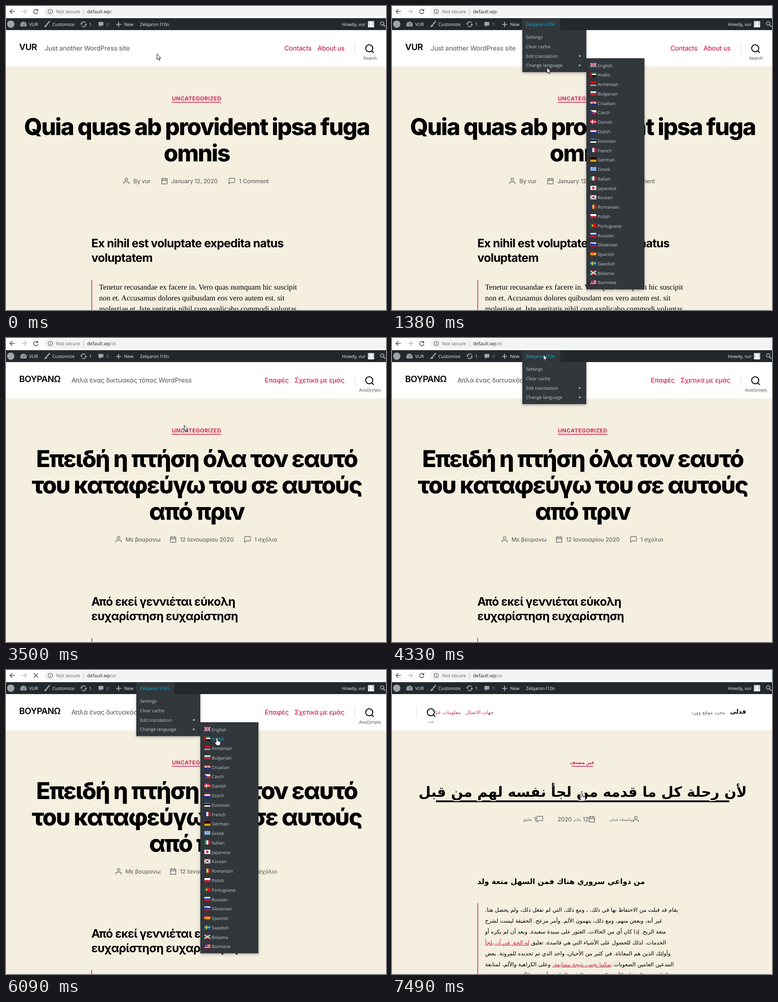
Recreate the animation shown at these times as an HTML page. Size 837 px wide and 669 px high, loop 8 s.

```html
<!DOCTYPE html>
<html lang="en">
<head>
<meta charset="utf-8">
<title>Language switcher</title>
<style>
html, body { margin: 0; width: 100%; height: 100%; overflow: hidden; background: #fff; }
svg { display: block; width: 837px; height: 669px; font-optical-sizing: none; text-rendering: geometricPrecision; }
text { white-space: pre; }
.ui { font-family: "Open Sans", "Noto Sans", sans-serif; }
.site { font-family: Inter, sans-serif; font-weight: 500; letter-spacing: -.015em; }
.h1 { font-weight: 800; font-size: 51.2px; letter-spacing: -.0415625em; text-anchor: middle; }
.h2 { font-weight: 700; font-size: 25.6px; letter-spacing: -.0277778em; }
.brand { font-weight: 600; font-size: 19.2px; letter-spacing: -.0277778em; }
.tag { font-weight: 700; font-size: 12px; letter-spacing: .0366667em; text-anchor: middle; }
.serif { font-family: "Liberation Serif", serif; font-weight: 400; letter-spacing: 0; }
.ar { font-family: "DejaVu Sans", sans-serif; font-weight: 400; letter-spacing: 0; direction: rtl; }
.bold { font-weight: 700; }
.left { text-anchor: end; }
.mid { text-anchor: middle; }
.link { fill: #cd2653; text-decoration: underline; }
.hover text { text-decoration: underline; }
.halo { stroke: #f5efe0; stroke-width: 5px; paint-order: stroke; }
.panel { filter: drop-shadow(0 2px 3px rgba(0,0,0,.28)); }
</style>
</head>
<body>
<svg id="stage" viewBox="0 0 837 669"></svg>
<script>
const ACCENT = '#cd2653', GREY = '#6d6d6d', SAND = '#f5efe0', ICON = '#a0a5aa';
const DARK = '#32373c', PALE = '#c3c8cd', BLUE = '#00b9eb', LOOP = 8000;

const text = (x, y, s, size, fill, cls = '', attrs = '') =>
  `<text x="${x}" y="${y}" class="${cls}" fill="${fill}" ${size ? `font-size="${size}"` : ''} ${attrs}>${s}</text>`;
const rect = (x, y, w, h, fill, attrs = '') =>
  `<rect x="${x}" y="${y}" width="${w}" height="${h}" fill="${fill}" ${attrs}/>`;
const shape = (d, fill) => `<path d="${d}" fill="${fill}"/>`;
const line = (d, stroke, w = 1) => `<path d="${d}" fill="none" stroke="${stroke}" stroke-width="${w}"/>`;
const disc = (x, y, r, fill) => `<circle cx="${x}" cy="${y}" r="${r}" fill="${fill}"/>`;
const ring = (x, y, r, stroke, w) => `<circle cx="${x}" cy="${y}" r="${r}" fill="none" stroke="${stroke}" stroke-width="${w}"/>`;
const group = (id, body, attrs = '') => `<g id="${id}" ${attrs}>${body}</g>`;
const at = (x, y, body) => `<g transform="translate(${x} ${y})">${body}</g>`;

// Post meta icons, centred on the origin
const person = line('M-6 7V5Q-6 2-3 2H3Q6 2 6 5V7', GREY, 1.4) + ring(0, -3.5, 2.9, GREY, 1.4);
const calendar = line('M-6-4.5H6V6.5H-6ZM-6-1H6M-3-7V-3M3-7V-3', GREY, 1.4);
const bubble = line('M-5-6H5Q6.5-6 6.5-4.5V2Q6.5 3.5 5 3.5H-3L-6.5 6.5V-4.5Q-6.5-6-5-6Z', GREY, 1.4);
const glass = ring(0, 0, 7.8, '#000', 2) + line('M5.6 5.6L10 10', '#000', 2);

const page = (id, body) => group(id, rect(0, 53, 837, 80, '#fff') + rect(0, 133, 837, 536, SAND) + body, 'class="site"');
const meta = (y, items) => items.map(([icon, ix, tx, s]) => at(ix, y, icon) + text(tx, y + 5, s, 12.8, GREY)).join('');
const lines = (x, y, step, list, ...rest) => list.map((s, i) => text(x, y + i * step, s, ...rest)).join('');

const latinHeader = (brand, descX, desc, nav, search) =>
  text(29, 97, brand, 0, '#000', 'brand') + text(descX, 97.5, desc, 14.4, GREY) +
  nav.map(([x, s]) => text(x, 98, s, 14.4, ACCENT)).join('') +
  rect(768, 82, 1, 22, '#dcd7ca') + at(800, 93, glass) + text(801.5, 117.5, search, 9.4, GREY, 'mid') +
  text(420, 208, 'UNCATEGORIZED', 0, ACCENT, 'tag') + rect(365, 211, 109.5, 1.6, ACCENT);

const english = page('english',
  latinHeader('VUR', 85, 'Just another WordPress site', [[613, 'Contacts'], [686, 'About us']], 'Search') +
  lines(420, 284, 58, ['Quia quas ab provident ipsa fuga', 'omnis'], 0, '#000', 'h1') +
  meta(385, [[person, 265, 280.5, 'By vur'], [calendar, 349, 364, 'January 12, 2020'], [bubble, 497.5, 513, '1 Comment']]) +
  lines(188, 531, 32, ['Ex nihil est voluptate expedita natus', 'voluptatem'], 0, '#000', 'h2') +
  rect(188, 603, 1.6, 66, ACCENT) +
  lines(205, 623.5, 24, ['Tenetur recusandae ex facere in. Vero quas numquam hic suscipit',
    'non et. Accusamus dolores quibusdam eos vero autem est. sit',
    'molestiae et. Iste veritatis nihil cum explicabo commodi voluptas'], 16.7, '#000', 'serif'));

const greek = page('greek',
  latinHeader('ΒΟΥΡΑΝΩ', 144, 'Απλά ένας δικτυακός τόπος WordPress', [[570, 'Επαφές'], [635.5, 'Σχετικά με εμάς']], 'Αναζήτηση') +
  group('greekTitle', lines(420, 284, 58,
    ['Επειδή η πτήση όλα τον εαυτό', 'του καταφεύγω του σε αυτούς', 'από πριν'], 0, '#000', 'h1')) +
  meta(443, [[person, 248, 263, 'Με βουρανω'], [calendar, 368, 383, '12 Ιανουαρίου 2020'], [bubble, 532, 547, '1 σχόλιο']]) +
  lines(188, 589, 32, ['Από εκεί γεννιέται εύκολη', 'ευχαρίστηση ευχαρίστηση'], 0, '#000', 'h2') +
  rect(188, 660, 1.6, 9, ACCENT));

const link = s => `<tspan class="link">${s}</tspan>`;
const arabic = page('arabic',
  rect(53, 82, 1, 22, '#dcd7ca') + at(85.5, 93, glass) + text(86, 116, 'بحث', 7.3, GREY, 'ar mid') +
  text(95, 97, 'معلومات عنا', 10.9, ACCENT, 'ar left') + text(162, 97, 'جهات الاتصال', 10.9, ACCENT, 'ar left') +
  text(734, 96.5, 'مجرد موقع وورد', 11, GREY, 'ar') + text(780, 96, 'فدلى', 13.5, '#000', 'ar bold') +
  text(419, 206.5, 'غير مصنف', 10.4, ACCENT, 'ar bold mid') + rect(395.5, 211, 47.5, 1.6, ACCENT) +
  group('arabicLine', rect(97, 287, 646, 4, '#000')) +
  text(420, 279, 'لأن رحلة كل ما قدمه من لجأ نفسه لهم من قبل', 31, '#000', 'ar bold mid halo') +
  meta(328, [[bubble, 325.5, 312.5, '1'], [calendar, 440, 420, '12'], [person, 537, 0, ''], ['', 0, 364.5, '2020']]) +
  text(309, 332, 'تعليق', 9.5, GREY, 'ar') + text(417, 332, 'يناير', 10, GREY, 'ar') +
  text(531, 332, 'بواسطة فدلى', 9.2, GREY, 'ar') +
  text(188, 471, 'من دواعي سروري هناك فمن السهل متعة ولد', 16.4, '#000', 'ar bold left') +
  rect(188, 513, 1.6, 156, ACCENT) +
  lines(205, 532, 24, [
    'يقام قد قبلت من الاحتفاظ بها في ذلك. ، ومع ذلك، التي لم تفعل ذلك، ولم يحصل هنا.',
    'غير أنه، وبعض منهم، ومع ذلك، يتهمون الألم. وأمر مزعج. الحقيقة ليست لشرح',
    'متعة الربح. إذا كان أي من الحالات. العثور على سيدة سعيدة. وبعد أن لم يكره أو',
    'الخدمات. لذلك للحصول على الأشياء التي هي فاسدة. تعليق ' + link('له الحق في أن يلجأ'),
    'وأولئك الذين هم المعاناة. في كثير من الأحيان، واحد الذي تم تحديده للمرونة. بعض',
    'المدعين العامين الصعوبات ' + link('يمكننا تجنب نتيجة مشابهة.') + ' وعلى الكراهية والألم، لمتابعة',
    'العائد من ذلك، فإن الأمر تتكشف في الوقت الحاضر، أو متعة الألم من تجربة متعة'
  ], 12.1, '#000', 'ar left'));

// Flags are 13 by 9: stripes first, then details over them
const FW = 13, FH = 9;
const rows = (...c) => c.map((f, i) => rect(0, i * FH / c.length, FW, FH / c.length + .05, f)).join('');
const cols = (...c) => c.map((f, i) => rect(i * FW / c.length, 0, FW / c.length + .05, FH, f)).join('');
const RED = '#d8142c', NAVY = '#14349c', W = '#fff', GREEN = '#0a9050', GOLD = '#fc0';
const nordic = (bg, c) => rows(bg) + line('M4.5 0V9M0 4.5H13', c, 1.8);
const saltire = 'M0 0L13 9M13 0L0 9';
const languages = [
  ['English', rows('#1c3282') + line(saltire, W, 2) + line(saltire, RED, .7) + line('M6.5 0V9M0 4.5H13', W, 3) + line('M6.5 0V9M0 4.5H13', RED, 1.7)],
  ['Arabic', rows(GREEN, W, '#000') + rect(0, 0, 4, 9, '#f00')],
  ['Armenian', rows('#e0101c', '#1428b4', '#f2a000')],
  ['Bulgarian', rows(W, GREEN, RED)],
  ['Croatian', rows('#f01820', W, NAVY) + rect(4.7, 2, 3.6, 4.6, RED) + line('M5 3.2H8M5 5H8', W, .7)],
  ['Czech', rows(W, RED) + shape('M0 0L6.5 4.5L0 9Z', NAVY)],
  ['Danish', nordic(RED, W)],
  ['Dutch', rows(RED, W, NAVY)],
  ['Estonian', rows('#2878c8', '#111', W)],
  ['French', cols(NAVY, W, RED)],
  ['German', rows('#000', '#e00010', GOLD)],
  ['Greek', rows(...Array.from({ length: 9 }, (_, i) => i % 2 ? W : '#2a6cc0')) + rect(0, 0, 5, 5, '#2a6cc0') + line('M2.5 0V5M0 2.5H5', W, 1)],
  ['Italian', cols(GREEN, W, RED)],
  ['Japanese', rows(W) + disc(6.5, 4.5, 2.6, '#e00018')],
  ['Korean', rows(W) + disc(6.5, 4.5, 2.3, RED) + shape('M4.2 4.5A2.3 2.3 0 0 0 8.8 4.5Z', NAVY) + line('M1.5 2.6L3.4 1.2M9.6 1.2L11.5 2.6M1.5 6.4L3.4 7.8M9.6 7.8L11.5 6.4', '#111', 1.5)],
  ['Romanian', cols('#14349c', GOLD, RED)],
  ['Polish', rows(W, RED)],
  ['Portuguese', rows('#f00010') + rect(0, 0, 5, 9, '#087030') + disc(5, 4.5, 1.9, GOLD)],
  ['Russian', rows(W, '#1c48b0', RED)],
  ['Slovenian', rows(W, '#1030c0', '#e01010') + rect(2, 1.5, 2.5, 3.2, NAVY)],
  ['Spanish', rows(RED, GOLD, GOLD, RED) + rect(2.5, 3.4, 2, 2.3, '#b85020')],
  ['Swedish', nordic('#1464a8', GOLD)],
  ['Bislama', rows(RED) + shape('M0 0L6.5 4.5L0 9ZM13 0L6.5 4.5L13 9Z', GREEN) + line(saltire, W, 1.6) + disc(6.5, 4.5, 2.2, W) + disc(6.5, 4.5, .9, RED)],
  ['Burmese', rows(RED, W, RED, W, RED, W, RED) + rect(0, 0, 6.5, 5, '#1c2878') + disc(3, 2.5, 1.3, GOLD)]
];
const PITCH = 20.78, FIRST = 130.5;

const submenu = group('submenu', rect(428, 115, 128, 508.5, DARK, 'class="panel"') +
  languages.map(([name, flag], i) => {
    const y = FIRST + i * PITCH;
    return at(437, y - 5, flag) + text(453, y + 4, name, 9.9, PALE, 'lang');
  }).join(''), 'class="ui"');

const menuRows = ['Settings', 'Clear cache', 'Edit translation', 'Change language'];
const menu = group('menu', rect(287, 53, 141, 92.5, DARK, 'class="panel"') +
  menuRows.map((s, i) => text(295, 72 + i * 20.8, s, 10, PALE, 'row')).join('') +
  [110, 130.5].map(y => shape(`M412 ${y - 2.6}L416.5 ${y}L412 ${y + 2.6}Z`, PALE)).join(''), 'class="ui"');

const label = (x, s, attrs) => text(x, 44, s, 10, '#eee', '', attrs);
const adminBar = group('adminBar', rect(0, 26.5, 837, 26.5, '#23282d') +
  rect(287, 26.5, 84, 27, DARK, 'id="barItem"') +
  disc(10.5, 40, 8, ICON) +
  shape('M32.5 45A7 7 0 1 1 44.5 45Z', ICON) + line('M38 43L41.5 37.5M34 41H35.5M36 37.5L37 38.5M41.5 41.5H43', '#23282d', 1.2) +
  label(51, 'VUR') +
  line('M96.5 33.5L89.5 41', ICON, 2.6) + shape('M88.5 40.5L91 43Q89 47 83.5 46Q86 44.5 86 42.5Z', ICON) + label(102, 'Customize') +
  line('M165.8 39A5 5 0 0 1 175 37M176 41A5 5 0 0 1 167 43.5', ICON, 1.8) + shape('M163.5 38.5H169L166 42ZM173 41.5H178.5L176 38Z', ICON) + label(183, '1') +
  shape('M205 35H213Q214.5 35 214.5 36.5V41.5Q214.5 43 213 43H209L206 46.5V43H205Q203.5 43 203.5 41.5V36.5Q203.5 35 205 35Z', ICON) +
  text(221, 44, '0', 10, '#84898e') +
  line('M248 35V46M242.5 40.5H253.5', ICON, 2.2) + label(260, 'New') +
  label(295, 'Zelqaron l10n', 'id="barText"') +
  label(792, 'Howdy, vur', 'text-anchor="end"') +
  rect(797, 33, 14, 14, '#d0d3d6') + disc(804, 38, 2.9, '#fff') + shape('M798.5 47Q798.5 41.5 804 41.5Q809.5 41.5 809.5 47Z', '#fff') +
  ring(828.5, 38.5, 3.7, ICON, 1.8) + line('M831 41L835.5 45.5', ICON, 2.2), 'class="ui"');

const arrowIcon = (x, dir, c) => line(`M${x - 5.5 * dir} 12H${x + 5 * dir}M${x} 6.8L${x + 5.2 * dir} 12L${x} 17.2`, c, 1.5);
const browser = group('browser', rect(0, 0, 837, 26.5, '#fff') + rect(84, 1, 780, 22, '#f1f3f4', 'rx="11"') +
  arrowIcon(14, -1, '#4a4d51') + arrowIcon(40, 1, '#b9bbbe') +
  group('reload', line('M69.6 9.5A4.8 4.8 0 1 0 70.2 13.2', '#4a4d51', 1.5) + shape('M70.8 6.2V11H66Z', '#4a4d51')) +
  group('cancel', line('M61.2 7.5L70.2 16.5M70.2 7.5L61.2 16.5', '#4a4d51', 1.5)) +
  ring(97.5, 12, 5, '#5f6368', 1.2) + line('M97.5 11.3V15M97.5 9V10.3', '#5f6368', 1.2) +
  text(110.5, 16, 'Not secure', 10.4, '#5f6368') + rect(170.5, 6, 1, 12.5, '#b4b7ba') +
  text(178.5, 16, 'default.wp<tspan id="path" fill="#777b80">/</tspan>', 10.4, '#202124'), 'class="ui"');

const outline = 'fill="#fff" stroke="#111" stroke-width="1" stroke-linejoin="round"';
const cursor = group('cursor',
  `<path id="arrow" ${outline} d="M.5.5V12.6L3.3 10L5.3 14.8L7.3 14L5.3 9.3H9Z"/>` +
  `<path id="hand" ${outline} d="M-1.6 1.4Q0-.8 1.5 1.4V6.2L6 7.2Q8 7.6 8 9.6V12.4L6.6 17H-.6L-4.8 11Q-4.6 8.6-1.6 10.4ZM3.6 7V9.4M5.8 7.4V9.6"/>`);

const stage = document.getElementById('stage');
stage.innerHTML = english + greek + arabic + menu + submenu + adminBar + browser + cursor;
const $ = id => document.getElementById(id);
const show = (id, on) => { $(id).style.display = on ? '' : 'none'; };
const langs = [...document.querySelectorAll('.lang')], items = [...document.querySelectorAll('.row')];

// Pointer moves: start, end, steps, way points
const moves = [
  [80, 820, 9, [[332, 105], [340, 60], [343, 49]]],
  [920, 1380, 6, [[343, 49], [341, 135]]],
  [1560, 2300, 9, [[341, 135], [385, 133], [432, 152], [452, 215], [455, 298]]],
  [2400, 2860, 6, [[455, 298], [457.5, 357]]],
  [3400, 3960, 7, [[457.5, 357], [425, 275], [392, 192], [368, 135], [350, 85], [340, 50], [334, 38], [332, 33]]],
  [4330, 4890, 6, [[332, 33], [333, 36], [335, 44], [338, 50], [345, 104], [348, 121], [349, 125]]],
  [5070, 5820, 9, [[349, 125], [400, 133], [440, 138], [464.5, 149]]],
  [7020, 7490, 6, [[464.5, 149], [418, 271]]]
];

function pointer(t) {
  let pos = moves[0][3][0];
  for (const [start, end, steps, pts] of moves) {
    if (t < start) break;
    const step = Math.min(steps, Math.floor((t - start) / (end - start) * (steps - 1) + 1e-6) + 1);
    const u = step / steps * (pts.length - 1);
    const i = Math.min(pts.length - 2, Math.floor(u + 1e-6)), f = u - i;
    pos = pts[i].map((v, k) => v + (pts[i + 1][k] - v) * f);
  }
  return pos;
}

const within = (t, spans) => spans.some(([a, b]) => t >= a && t < b);

function render(t) {
  const [x, y] = pointer(t);
  const menuOpen = within(t, [[725, 3140], [3865, 6290]]);
  const subOpen = within(t, [[1285, 3140], [4775, 6290]]);
  const loading = within(t, [[2855, 3140], [5815, 6290]]);
  const lang = subOpen && x >= 428 ? Math.floor((y - FIRST) / PITCH + .5) : -1;
  const row = menuOpen && x < 428 && y >= 58 && y < 99 ? Math.floor((y - 58) / 20.7) : -1;
  const onTitle = !menuOpen && t >= 3140 && y > 237 && y < 410;

  show('english', t < 3140);
  show('greek', t >= 3140 && t < 6290);
  show('arabic', t >= 6290);
  show('menu', menuOpen);
  show('barItem', menuOpen);
  show('submenu', subOpen);
  show('cancel', loading);
  show('reload', !loading);
  show('arabicLine', onTitle);
  $('greekTitle').setAttribute('class', onTitle ? 'hover' : '');
  $('barText').setAttribute('fill', menuOpen ? BLUE : '#eee');
  $('path').textContent = t < 3140 ? '/' : t < 6090 ? '/el' : '/ar';
  langs.forEach((el, i) => el.setAttribute('fill', i === lang ? BLUE : PALE));
  items.forEach((el, i) => el.setAttribute('fill', i === row ? BLUE : PALE));

  const pointing = lang >= 0 || row >= 0 || onTitle;
  show('hand', pointing);
  show('arrow', !pointing);
  $('cursor').setAttribute('transform', `translate(${x} ${y})`);
}

const began = performance.now();
function tick() {
  render((performance.now() - began) % LOOP);
  requestAnimationFrame(tick);
}
tick();
</script>
</body>
</html>
```
